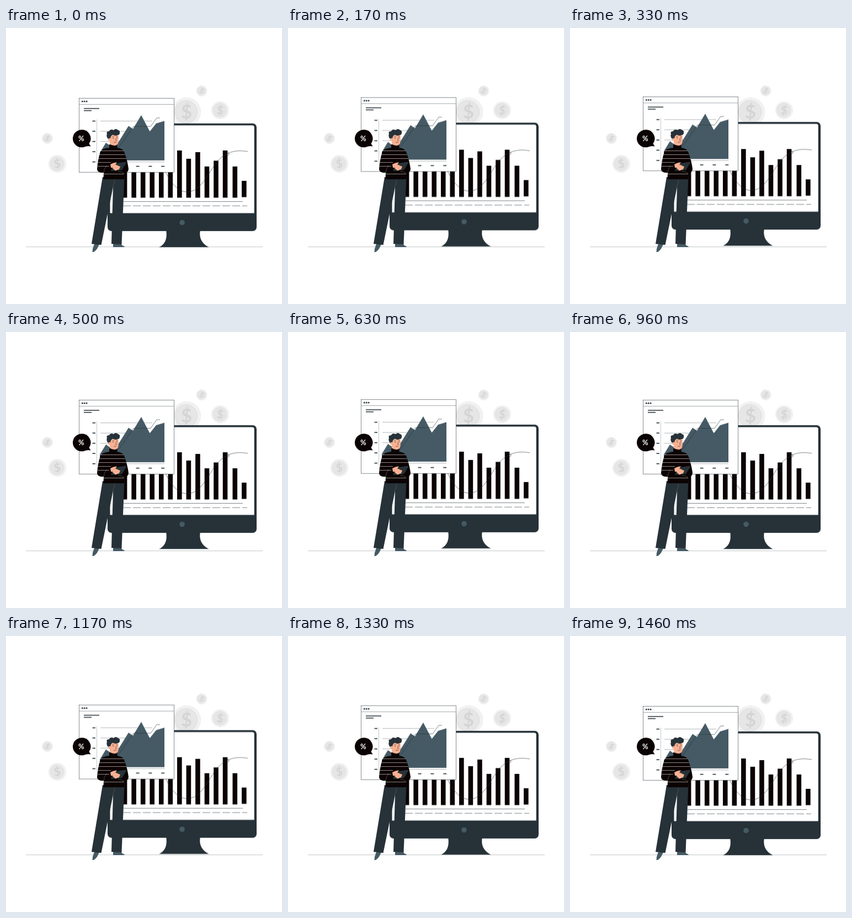
An HTML page that plays this animation: 500x500 px, repeating every 1500 ms.

```html
<!DOCTYPE html>
<html lang="en">
<head>
<meta charset="utf-8">
<title>Market report</title>
<style>
  html, body { margin: 0; width: 100%; height: 100%; overflow: hidden; background: #fff; }
  svg { display: block; width: 100vw; height: 100vh; }
  .float { animation: float 1.5s linear -20ms infinite; }
  @keyframes float {
    50% { transform: translateY(-6px); }
  }
  .ink { fill: #0b0303; }
  .navy { fill: #263238; }
  .slate { fill: #455a64; }
  .skin { fill: #f8b092; }
  .thin { fill: none; stroke: #263238; stroke-width: .6; }
  .tick { fill: none; stroke: #263238; stroke-width: 1.6; }
  .stripe { fill: none; stroke: #e8dcd8; stroke-width: .6; }
  .coin text { font: bold 34px Lato, "Open Sans", sans-serif; fill: #d4d4d4; text-anchor: middle; }
  .pct { font: bold 13px Lato, "Open Sans", sans-serif; fill: #fff; text-anchor: middle; }
</style>
</head>
<body>
<svg viewBox="0 0 500 500">
  <defs>
    <g id="coin" class="coin">
      <circle r="26.5" fill="#f1f1f1"/>
      <circle cx="-1" r="21" fill="#e6e6e6"/>
      <circle cx="-1" r="20.5" fill="none" stroke="#dedede"/>
      <text y="12">$</text>
    </g>
  </defs>

  <path d="M36 396.5H465" stroke="#b4b9bb" stroke-width=".8"/>

  <use href="#coin" transform="translate(327 152)"/>
  <use href="#coin" transform="translate(388 149) rotate(8) scale(.61)"/>
  <use href="#coin" transform="translate(354.5 114) rotate(35) scale(.38)"/>
  <use href="#coin" transform="translate(75 200) rotate(35) scale(.38)"/>
  <use href="#coin" transform="translate(93 246) rotate(-8) scale(.61)"/>

  <g class="float">
    <!-- monitor -->
    <path class="navy" d="M290 366C293 383 287 393 277 397.3H367.5C356 391 349 382 352 366Z"/>
    <rect class="navy" x="184" y="173" width="270" height="195" rx="7"/>
    <path d="M188.500 335.500V180Q188.500 176.500 192 176.500H446Q449.700 176.500 449.700 180V335.500Z" fill="#fff"/>
    <circle class="slate" cx="319" cy="352.500" r="4.800"/>
    <g id="bars" class="ink"></g>
    <path class="thin" d="M213 314.500H429"/>
    <path class="thin" d="M212 322.300H437" stroke-dasharray="14 4"/>
    <path class="thin" d="M289 261C299 280 311 297 328 297C354 297 366 262 382 243C394 228 412 219 438 224"/>
    <circle class="thin" cx="402" cy="228.500" r="2"/>

    <!-- browser window -->
    <rect x="132.500" y="127.500" width="172" height="134" fill="#fff" stroke="#263238" stroke-width=".55"/>
    <path class="thin" d="M133 138.500H304" opacity=".7"/>
    <g class="navy">
      <circle cx="138.300" cy="133.200" r="1.400"/>
      <circle cx="142.200" cy="133.200" r="1.400"/>
      <circle cx="146.100" cy="133.200" r="1.400"/>
    </g>
    <path class="tick" d="M141 146H169M141 149.800H155"/>
    <path class="thin" d="M164.500 166V246" opacity=".45"/>
    <g id="ticks"></g>
    <path class="slate" d="M170 240V226L181 208L190 214L203 208L222 177.500L230 183L245 158L260.500 187.500L272 173L287 168.500V240Z"/>
    <path class="thin" d="M185 240L209 210L231 178.500H262L273 163H279"/>
  </g>

  <!-- speech bubble -->
  <path class="ink" d="M137 184.300A16 16 0 1 0 144 214.700Q149 213.500 153.500 214.500L150.500 209.500A16 16 0 0 0 137 184.300Z"/>
  <text class="pct" x="136.300" y="205">%</text>

  <!-- person -->
  <g>
    <path class="slate" d="M160 391L169 392L165 400Q160 406.500 156.500 406L157 400Z"/>
    <path class="slate" d="M194 390H208Q210 394.500 214.500 395.500V397H194Z"/>
    <path class="navy" d="M175 270L155 391L172.500 393L194 288L191 391L209.500 392L214.500 270Z"/>
    <path d="M197 275Q196 283 193 289" fill="none" stroke="#607078" stroke-width=".5"/>

    <path class="ink" d="M187 211H201.500V217Q211 218 214 224Q220 240 222 255Q222 262 214 263L214.500 274H176.500L177 262Q166 263 165 256Q166 239 171 224Q174 218 187 217Z"/>
    <path class="stripe" d="M171 222.500H213M168.500 229.500H215.500M167 236.500H218M166 243.500H190M165.500 250.500H187M177 264.500H214"/>
    <path class="stripe" d="M177 262Q177 256 182 249M214 263Q209 260 203 260" opacity=".5"/>

    <path class="navy" d="M195 246L216 242.500Q218 243 217.300 245L211 256Q210 257.500 208 257.700L190 259Z"/>
    <path class="skin" d="M189 247Q195 243 201 243.500L198 247.500L203 249L195 253L190 253Z"/>
    <path class="skin" d="M193 254Q198 248 203 249.500L207 251L205 256L198 258.500Z"/>

    <path class="skin" d="M188 194L203 192Q205 201 203 209Q201 213 197 213Q192 213.500 188 210Z"/>
    <circle class="skin" cx="187.500" cy="202" r="2.500"/>
    <path class="navy" d="M185 201Q181 197 183 192Q181 187 187 187Q189 182 195 185Q199 181 203 185Q207 186 206 190Q206 194 202 194Q198 196 194 193.500Q190 194 189 200Q187 198.500 185 201Z"/>
    <g class="navy">
      <circle cx="194.300" cy="199.300" r=".8"/>
      <circle cx="200.800" cy="199" r=".8"/>
    </g>
    <path class="thin" d="M192.500 197L195.500 196M199.500 196L202.500 196.500M198.500 200L200 204H198M195 207Q198 208 200 206.500"/>
  </g>
</svg>
<script>
  const add = (id, tag, attrs) => {
    const el = document.createElementNS("http://www.w3.org/2000/svg", tag);
    for (const key in attrs) el.setAttribute(key, attrs[key]);
    document.getElementById(id).append(el);
  };

  const tops = [250, 250, 250, 250, 250, 250, 222, 237, 225, 251, 240.5, 222, 251, 277];
  tops.forEach((y, i) => add("bars", "rect", {
    x: 210.8 + i * 16.54 + (i > 11 ? 1.2 : 0), y, width: 8.6, height: (i > 12 ? 306.5 : 307.5) - y
  }));

  for (let i = 0; i < 5; i++) {
    const y = 168.7 + i * 18.5;
    add("ticks", "path", { class: "tick", d: `M156.500 ${y}h5.500` });
    add("ticks", "path", { class: "thin", opacity: .6, d: `M171 ${y}H${i ? 287 : 265}` });
    add("ticks", "path", { class: "tick", d: `M${190 + i * 22.8} 250.700h6` });
  }
</script>
</body>
</html>
```
